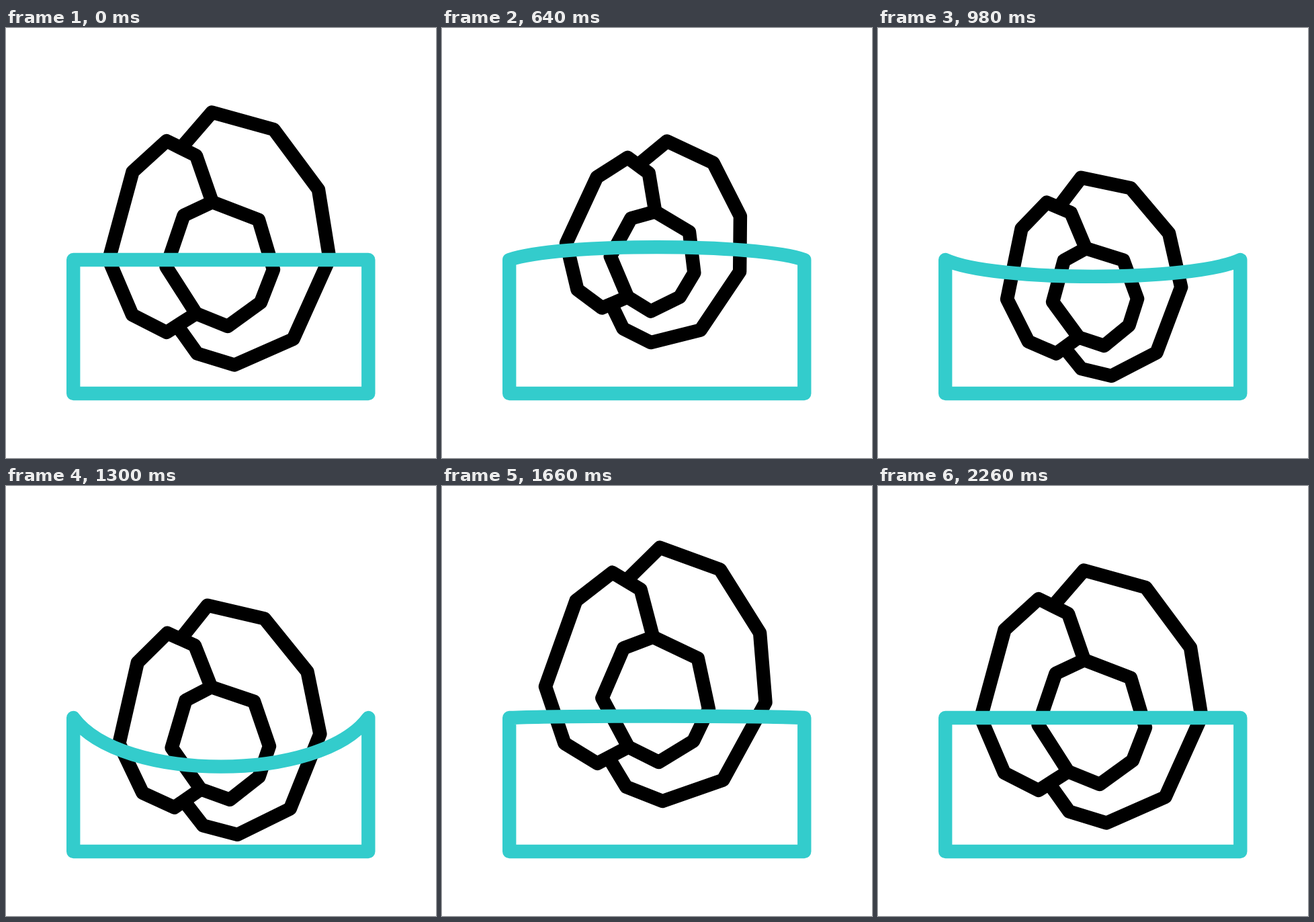
An HTML page that plays this animation: 640x640 px, repeating every 2400 ms.

```html
<!DOCTYPE html>
<html lang="en">
<head>
<meta charset="utf-8">
<title>Stone on water</title>
<style>
  html, body { margin: 0; width: 100%; height: 100%; overflow: hidden; background: #fff; }
  svg { display: block; width: 100%; height: 100%; }

  path {
    fill: none;
    stroke: #000;
    stroke-width: 20.4;
    stroke-linecap: round;
    stroke-linejoin: round;
    vector-effect: non-scaling-stroke;
  }
  .water { stroke: #3cc; }

  .sway, .bob, .stone, .water {
    animation: 2400ms cubic-bezier(.333, 0, .667, 1) infinite;
  }
  .sway { animation-name: sway; }
  .bob { animation-name: bob; }
  .stone { animation-name: rock, shrink; transform-origin: 323px 314px; }
  .water { animation-name: wave; }

  @keyframes sway {
    0%, 90.417%, 100% { translate: 0 0; }
    13.333% { translate: 3px 0; }
    26.667% { translate: -.4px 0; }
    40.833% { translate: 1.7px 0; }
    54.167% { translate: -1px 0; }
    69.167% { translate: 2.8px 0; }
  }
  @keyframes bob {
    0%, 90.417%, 100% { translate: 0 0; }
    16.667% { translate: 0 -4px; animation-timing-function: cubic-bezier(.333, 0, .667, .256); }
    26.667% { translate: 0 4.6px; animation-timing-function: cubic-bezier(.333, .19, .667, 1); }
    42.5% { translate: 0 58px; animation-timing-function: cubic-bezier(.333, 0, .667, .529); }
    54.167% { translate: 0 34.8px; animation-timing-function: cubic-bezier(.333, .195, .667, 1); }
    68.333% { translate: 0 -33.3px; }
  }
  @keyframes rock {
    0%, 90.417%, 100% { rotate: 0deg; }
    24.167% { rotate: 10.3deg; }
    45.625% { rotate: -5.6deg; }
    68.333% { rotate: 4.5deg; }
  }
  @keyframes shrink {
    0%, 68.75%, 100% { scale: 1; }
    34.167% { scale: .768; }
  }
  @keyframes wave {
    0%, 94.167%, 100% { d: path("M100.2 345 C172 345 467.5 345 539.3 345 L539.3 544 L100.2 544 Z"); }
    30% { d: path("M100.2 345 C172 318.9 467.5 318.9 539.3 345 L539.3 544 L100.2 544 Z"); }
    52.5% { d: path("M100.2 345 C172 443.7 467.5 443.7 539.3 345 L539.3 544 L100.2 544 Z"); }
    77.083% { d: path("M100.2 345 C172 309 467.5 309 539.3 345 L539.3 544 L100.2 544 Z"); }
  }
</style>
</head>
<body>
<svg viewBox="0 0 640 640">
  <g class="sway">
    <g class="bob">
      <g class="stone">
        <path d="M261 178 L306.5 125.5 L398.5 151 L465 240.5 L481.5 343 L427.5 463 L340 501.5 L284.5 484.5 L257 446"/>
        <path d="M307 259 L283 190 L239 168 L188.5 214 L153 345 L188 427 L239 453 L283 425"/>
        <path d="M307 259 L376 285.5 L398 359.5 L379 408.5 L330 444 L283 425 L238.5 355.5 L264.5 279 Z"/>
      </g>
    </g>
  </g>
  <path class="water" d="M100.2 345 C172 345 467.5 345 539.3 345 L539.3 544 L100.2 544 Z"/>
</svg>
</body>
</html>
```
